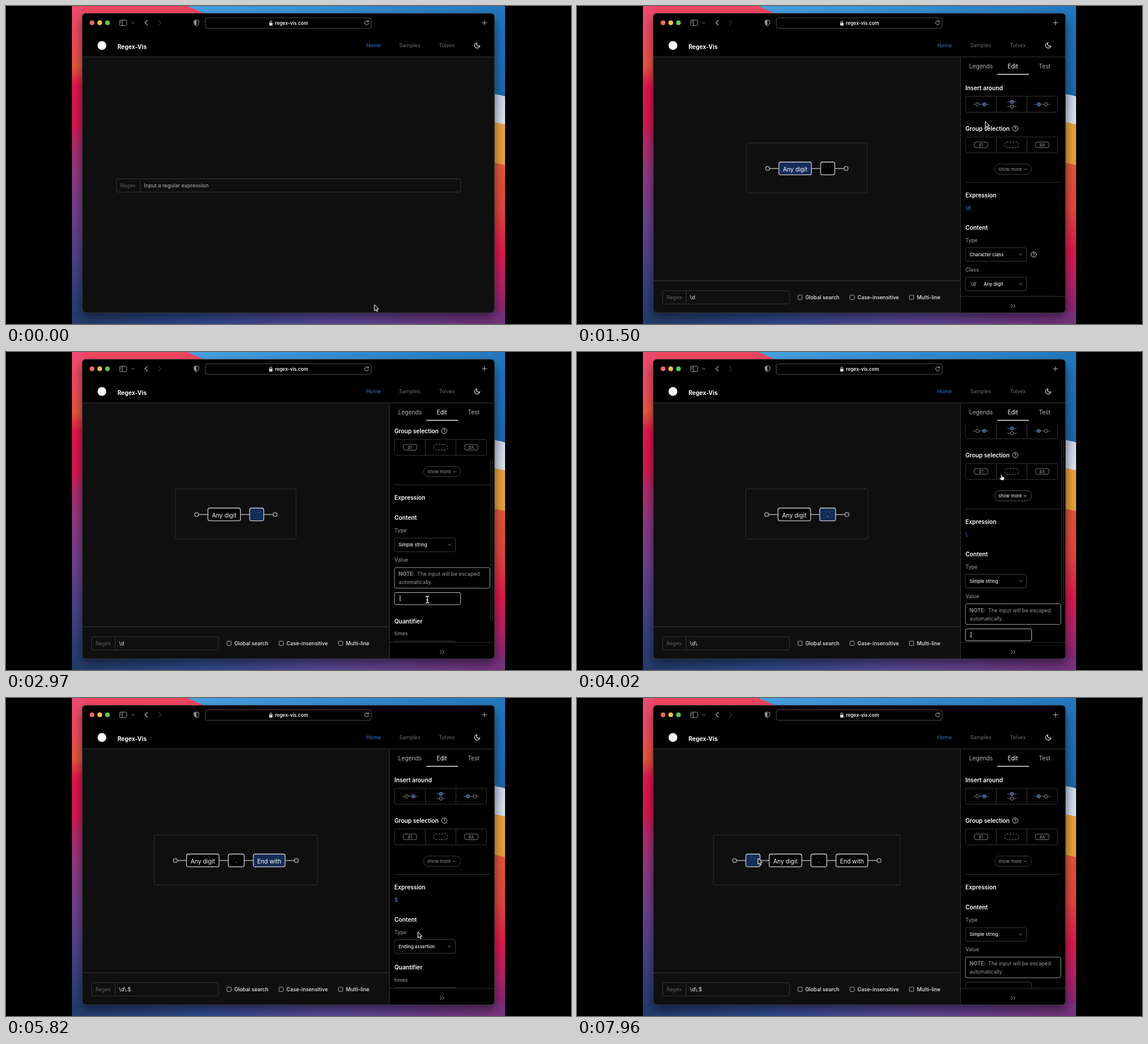
Write an HTML page that moves like this. It is 960 by 540 pixels and loops after 8 s.

```html
<!DOCTYPE html>
<html lang="en">
<head>
<meta charset="utf-8">
<title>Regex editor demo</title>
<style>
html, body { margin: 0; width: 100%; height: 100%; overflow: hidden; background: #000; }
svg { display: block; width: 960px; height: 540px; font-family: Inter, Roboto, sans-serif; }
</style>
</head>
<body>
<svg id="stage" viewBox="0 0 960 540" xmlns="http://www.w3.org/2000/svg">
  <defs>
    <linearGradient id="left" x2="0" y2="1">
      <stop offset="0" stop-color="#ea4b70"/><stop offset=".12" stop-color="#ee4c5c"/>
      <stop offset=".19" stop-color="#e9573f"/><stop offset=".25" stop-color="#e3174e"/>
      <stop offset=".37" stop-color="#d6164f"/><stop offset=".43" stop-color="#b32a6c"/>
      <stop offset=".52" stop-color="#913880"/><stop offset=".65" stop-color="#71408c"/>
      <stop offset=".8" stop-color="#4c4288"/><stop offset=".92" stop-color="#2e3f78"/>
      <stop offset="1" stop-color="#223c6c"/>
    </linearGradient>
    <linearGradient id="top">
      <stop offset="0" stop-color="#58b0e8"/><stop offset=".5" stop-color="#3c93d6"/><stop offset="1" stop-color="#2377bd"/>
    </linearGradient>
    <linearGradient id="sky" x2="0" y2="1">
      <stop offset="0" stop-color="#2377bd"/><stop offset="1" stop-color="#1c68ab"/>
    </linearGradient>
    <linearGradient id="pale" x2="1" y2=".6">
      <stop offset="0" stop-color="#bccbe8"/><stop offset="1" stop-color="#dde3ee"/>
    </linearGradient>
    <linearGradient id="warm" x2="0" y2="1">
      <stop offset="0" stop-color="#e4573c"/><stop offset=".3" stop-color="#e2463f"/>
      <stop offset=".55" stop-color="#df184e"/><stop offset=".75" stop-color="#b3216a"/>
      <stop offset="1" stop-color="#6c2b76"/>
    </linearGradient>
    <linearGradient id="low">
      <stop offset="0" stop-color="#243c6c"/><stop offset=".3" stop-color="#2f4a8e"/>
      <stop offset=".6" stop-color="#5b4898"/><stop offset="1" stop-color="#78317c"/>
    </linearGradient>
    <filter id="blur" x="-10%" y="-10%" width="120%" height="120%"><feGaussianBlur stdDeviation="9"/></filter>
    <clipPath id="desk"><rect x="112" width="736" height="540"/></clipPath>
    <clipPath id="win"><rect x="129.5" y="12.5" width="700.5" height="508.5" rx="6"/></clipPath>
    <clipPath id="side"><rect x="652" y="122" width="178" height="371"/></clipPath>
  </defs>

  <rect width="960" height="540"/>
  <g clip-path="url(#desk)">
    <rect x="112" width="736" height="14" fill="url(#top)"/>
    <path d="M112 0H308L340 14H112Z" fill="#ef4660"/>
    <rect x="112" width="20" height="540" fill="url(#left)"/>
    <rect x="828" width="20" height="152" fill="url(#sky)"/>
    <path d="M828 149L848 153V202L828 197Z" fill="url(#pale)"/>
    <path d="M828 197L848 201V271L828 266Z" fill="#e7a33e"/>
    <path d="M828 266L848 270V540H828Z" fill="url(#warm)"/>
    <rect x="112" y="519" width="736" height="21" fill="url(#low)"/>
    <rect x="129" y="22" width="702" height="507" rx="8" opacity=".5" filter="url(#blur)"/>
  </g>

  <g clip-path="url(#win)">
    <rect x="129" y="12" width="702" height="510" fill="#0f0f10"/>
    <rect x="129" y="12" width="702" height="74.5"/>
    <path d="M129 86.5H831" stroke="#333"/>
    <g id="chrome"></g>
    <g id="page"></g>
    <g clip-path="url(#side)"><g id="scroll"></g></g>
    <rect id="thumb" x="823.5" width="3" height="276" rx="1.5" fill="none" stroke="#2b2b2b"/>
  </g>
  <rect x="129.5" y="12.5" width="700.5" height="508.5" rx="6" fill="none" stroke="#424242" stroke-width=".8"/>

  <g id="pointer" stroke-linejoin="round">
    <path id="arrow" d="M0 0V10.4L2.4 8.3L4 11.8L5.7 11L4.1 7.6H7.2Z" fill="#111" stroke="#fff"/>
    <path id="beam" d="M-3 -5.5Q0 -5.5 0 -3.5Q0 -5.5 3 -5.5M0 -3.5V4M-3 6Q0 6 0 4Q0 6 3 6M-1.5 1H1.5" fill="none" stroke="#eee" stroke-width="1.3"/>
    <path id="hand" d="M-2 -4.5Q-1 -5.5 -.4 -4.4L.2 -1.2L3.6 -.5Q4.6 0 4.3 1.4L3.5 4.7H-1.6L-4 1.4Q-4 .2 -2.6 .8L-1.6 1.6Z" fill="#fff" stroke="#222" stroke-width=".7"/>
  </g>
</svg>

<script>
const LOOP = 8000;
const $ = id => document.getElementById(id);

// Drawing helpers; text is placed by its vertical middle.
const text = (x, y, s, size, fill = '#fff', weight = 400, anchor = 'start') =>
  `<text x="${x}" y="${y + size * 0.36}" font-size="${size}" fill="${fill}" font-weight="${weight}" text-anchor="${anchor}">${s}</text>`;
const box = (x, y, w, h, stroke, rx = 2.5, extra = '') =>
  `<rect x="${x}" y="${y}" width="${w}" height="${h}" rx="${rx}" fill="none" stroke="${stroke}" ${extra}/>`;
const path = (d, stroke, width = 1, extra = '') =>
  `<path d="${d}" fill="none" stroke="${stroke}" stroke-width="${width}" ${extra}/>`;
const dot = (x, y, r, fill, stroke = 'none', width = 1) =>
  `<circle cx="${x}" cy="${y}" r="${r}" fill="${fill}" stroke="${stroke}" stroke-width="${width}"/>`;
const rule = y => path(`M660 ${y}H822`, '#2e2e2e');
const help = (x, y) => dot(x, y, 4.5, 'none', '#ccc') + text(x, y, '?', 7, '#ddd', 500, 'middle');
const chevron = (x, y, s = 2.5, c = '#888') => path(`M${x - s} ${y - s / 2}L${x} ${y + s / 2}L${x + s} ${y - s / 2}`, c);

const KINDS = {
  d: { width: 55.3, label: 'Any digit', expr: '\\d', type: 'Character class' },
  e: { width: 24, label: '', expr: '', type: 'Simple string' },
  '.': { width: 27, label: '.', expr: '\\.', type: 'Simple string' },
  $: { width: 54, label: 'End with', expr: '$', type: 'Ending assertion' }
};

// start, nodes, selected index, regex
const STEPS = [
  [0, '', -1, ''],
  [620, '', -1, '\\'],
  [740, 'd', -1, '\\d'],
  [1110, 'd', 0, '\\d'],
  [1420, 'de', 0, '\\d'],
  [1680, 'de', 1, '\\d'],
  [3200, 'd.', 1, '\\d\\.'],
  [4390, 'd.e', 1, '\\d\\.'],
  [5200, 'd.e', 2, '\\d\\.'],
  [5760, 'd.$', 2, '\\d\\.$'],
  [6420, 'd.$', 0, '\\d\\.$'],
  [7000, 'ed.$', 1, '\\d\\.$'],
  [7930, 'ed.$', 0, '\\d\\.$']
];

// time, x, y
const MOVES = [
  [30, 626, 507], [520, 538, 291], [870, 538, 291], [1080, 395, 276], [1130, 395, 276],
  [1390, 790, 167], [1430, 790, 167], [1640, 428, 276], [1690, 428, 276],
  [1940, 735.5, 353.5], [2570, 735.5, 353.5], [2930, 716, 420], [3530, 716, 420],
  [4020, 722, 213], [4330, 791, 164], [4400, 791, 164], [4660, 600, 236],
  [4920, 600, 236], [5130, 448, 275], [5240, 448, 275], [5520, 706, 399],
  [5780, 706, 399], [6320, 331.5, 273], [6610, 331.5, 273], [6900, 686, 167],
  [7440, 686, 167], [7860, 307.5, 272]
];

const SCROLL = [
  [1800, 0], [1970, 74], [3560, 74], [4020, 33], [4260, 3.5], [5199, 3.5], [5200, 0]
];

// start, pointer shape
const SHAPES = [
  [0, 'arrow'], [1040, 'beam'], [1160, 'arrow'], [1340, 'hand'], [1460, 'arrow'],
  [1610, 'beam'], [1720, 'arrow'], [2900, 'beam'], [3600, 'arrow'], [3960, 'hand'],
  [4440, 'arrow'], [5080, 'beam'], [5280, 'arrow'], [6260, 'beam'], [6650, 'arrow'],
  [6840, 'hand'], [7500, 'arrow']
];

const current = (list, t) => list.filter(row => row[0] <= t).pop();

function tween(list, t, i) {
  const k = list.findIndex(row => row[0] > t);
  if (k === 0) return list[0][i];
  if (k < 0) return list[list.length - 1][i];
  const a = list[k - 1], b = list[k];
  const p = (t - a[0]) / (b[0] - a[0]);
  return a[i] + (b[i] - a[i]) * p * p * (3 - 2 * p);
}

function chrome() {
  const lights = ['#ec6a5e', '#f4bf4f', '#61c554'].map((c, i) => dot(146.2 + i * 13.1, 28.5, 4, c)).join('');
  return lights
    + box(193, 24, 12, 9.3, '#999', 1.8) + path('M197.5 24V33.3M194.5 26.5H196M194.5 28.5H196', '#999')
    + chevron(215.5, 28.5, 2.2, '#999')
    + path('M240.5 24L236 28.4L240.5 32.8', '#aaa', 1.2) + path('M259 24L263 28.4L259 32.8', '#333', 1.2)
    + path('M323.5 23.5L327.7 25V28.5Q327.7 32 323.5 33.7Q319.3 32 319.3 28.5V25Z', '#999')
    + '<path d="M323.5 24V33Q320 31.5 320 28.5V25.3Z" fill="#999"/>'
    + box(338.5, 20, 282, 18, '#4c4c4c', 4)
    + '<rect x="447.2" y="28.6" width="5.6" height="4.6" rx=".8" fill="#ddd"/>' + path('M448.4 29V27.2A1.6 1.7 0 0 1 451.6 27.2V29', '#ddd')
    + text(457, 29.3, 'regex-vis.com', 8.05, '#f2f2f2', 600)
    + path('M615.6 26.6A3.4 3.4 0 1 0 616.3 29M616 24.6V27H613.6', '#bbb')
    + path('M808.8 28.5H817.2M813 24.3V32.7', '#aaa', 1.1)
    + dot(163, 67, 7.5, '#fff')
    + text(189.5, 69, 'Regex-Vis', 9.9, '#fff', 700)
    + text(612, 67, 'Home', 8.9, '#2d78c9')
    + text(668, 67, 'Samples', 8.9, '#6c6c6c')
    + text(735.5, 67, 'Tolvex', 8.9, '#6c6c6c')
    + path('M21 12.8A9 9 0 1 1 11.2 3A7 7 0 0 0 21 12.8Z', '#eee', 2.2, 'transform="translate(794.6 61) scale(.5)" stroke-linejoin="round"');
}

function home(regex, focus) {
  return box(187.5, 293.5, 585, 22.5, '#333', 3) + path('M228 293.5V316', '#333')
    + (focus ? box(228, 293.5, 544.5, 22.5, '#9a98ac', 2) : '')
    + text(194, 305, 'Regex', 8.95, '#5c5c5c')
    + text(234.5, 305, regex || 'Input a regular expression', 8.95, regex ? '#eee' : '#b4b4b4');
}

function quoted(x, y, s, size = 10.2) {
  const half = s.length * size * 0.29 + 2;
  return text(x - half, y - 1.5, "'", 7, '#777', 400, 'middle')
    + text(x, y, s, size, '#fff', 400, 'middle')
    + text(x + half, y - 1.5, "'", 7, '#777', 400, 'middle');
}

function node(x, kind, selected) {
  const { width, label } = KINDS[kind], mid = x + width / 2;
  let out = `<rect x="${x}" y="265" width="${width}" height="21.6" rx="3.2" fill="${selected ? '#152c58' : '#000'}" stroke="#c6c6cb" stroke-width="1.3"/>`;
  if (width < 30) {
    out += text(mid - 3.2, 274.5, "'", 7, '#75809a', 400, 'middle') + text(mid + 3.2, 274.5, "'", 7, '#75809a', 400, 'middle');
    if (label) out += text(mid, 276.8, label, 10, '#fff', 400, 'middle');
  } else out += text(mid, 277, label, 10, '#fff', 400, 'middle');
  return out;
}

function graph(kinds, selected) {
  const gap = 15.6, end = 19.2, pad = 35.7;
  const inner = [...kinds].reduce((sum, k) => sum + KINDS[k].width + gap, -gap);
  const width = inner + 2 * (end + pad), left = 390.5 - width / 2;
  const first = left + pad, last = left + width - pad;
  let x = first + end, out = box(left, 232.5, width, 85, '#303030', 2, 'stroke-width=".9"');
  out += path(`M${first} 276H${last}`, '#a5a5a9', 1.3);
  out += dot(first, 276, 3.4, '#0f0f10', '#a5a5a9', 1.4) + dot(last, 276, 3.4, '#0f0f10', '#a5a5a9', 1.4);
  [...kinds].forEach((k, i) => {
    out += node(x, k, i === selected);
    x += KINDS[k].width + gap;
  });
  return out;
}

function editor(kinds, selected, regex) {
  const legend = selected < 0;
  const flags = [[379, 'Global search'], [467.5, 'Case-insensitive'], [568.5, 'Multi-line']];
  const tabs = [[686.5, 'Legends', legend], [740.5, 'Edit', !legend], [794.5, 'Test', false]];
  const tone = (name, on) => on ? '#fff' : legend && name === 'Edit' ? '#444' : '#b0b0b0';
  return graph(kinds, selected)
    + path('M129 466.5H651', '#333')
    + box(145.5, 483.5, 215.5, 22.5, '#333', 3) + path('M185.5 483.5V506', '#333')
    + (legend ? box(185.5, 483.5, 175.5, 22.5, '#a7a4b8', 2) + path('M201.8 489.5V499.5', '#fff', 0.9) : '')
    + text(152, 494.8, 'Regex', 8.95, '#5c5c5c') + text(192, 494.8, regex, 9, '#eee')
    + flags.map(([x, s]) => box(x - 3.7, 491, 7.4, 7.4, '#a8a8a8', 1.5) + text(x + 9, 494.8, s, 8.8, '#eee', 500)).join('')
    + '<rect x="652" y="87" width="179" height="435"/>' + path('M651.5 87V522M652 493H831', '#333')
    + tabs.map(([x, s, on]) => text(x, 102, s, 9.8, tone(s, on), 400, 'middle')).join('')
    + path(`M${legend ? 660 : 714} 116H${legend ? 714 : 768}`, '#ddd', 1.3)
    + path('M737.5 506.5L740.3 509.5L737.5 512.5M741.3 506.5L744.1 509.5L741.3 512.5', '#aaa');
}

function legends() {
  const head = (y, s) => text(660, y, s, 9.85, '#fff', 600);
  const body = (y, s) => text(660, y, s, 9.5, '#8c8c8c');
  const frame = (y, w) => box(662.4, y, w, 21.4, '#c0c0c5', 3.2, 'stroke-width="1.3"');
  const range = (y, s) => text(685.5, y, s, 7.75, '#eee', 500, 'middle') + frame(y + 6.7, 46.2)
    + quoted(672.5, y + 18.5, 'a') + text(685.5, y + 18, '-', 9, '#bbb', 400, 'middle') + quoted(698.5, y + 18.5, 'z');
  return dot(664, 130.5, 4, 'none', '#ddd') + path('M661.8 130.5H666.2M664 128.3V132.7', '#ddd')
    + text(672.5, 130.3, 'You can select nodes by dragging', 8.8, '#eee', 500) + text(660, 144, 'or clicking', 8.8, '#eee', 500)
    + rule(153.5) + head(172.5, 'Characters:') + frame(190, 36.8) + quoted(681, 201.8, 'abc') + body(222, 'Direct match characters')
    + rule(237.5) + head(253.8, 'Character classes:') + frame(271.3, 54.3) + text(689.5, 283, 'Any digit', 10, '#fff', 400, 'middle')
    + body(303.3, 'Distinguish different types of') + body(319, 'characters')
    + rule(334.5) + head(351, 'Ranges:') + range(368, 'One of')
    + body(413, 'Matches any one of the enclosed') + body(428.7, 'characters') + range(455.3, 'None of');
}

function edit(kind, focus, bright) {
  const { expr, type } = KINDS[kind];
  const head = (y, s) => text(660, y, s, 9.85, '#fff', 600);
  const label = (y, s) => text(660, y, s, 8.75, '#8c8c8c', 500);
  const trio = y => box(660, y, 156.5, 27, '#333', 2.5) + path(`M712.5 ${y}v27M764.5 ${y}v27`, '#333');
  const select = (y, s) => box(660, y - 11.5, 103.5, 23, '#383838') + s + chevron(753.5, y);
  const chain = (x, y, blue, plain) => path(`M${x - 13.5} ${y}h27`, '#666')
    + dot(plain, y, 2.8, '#000', '#888') + dot(blue, y, 2.8, '#284f88', '#6683ad');
  const pill = (x, s, extra = '') => box(x - 11.5, 231, 23, 9.6, '#777', 3, extra) + text(x, 236, s, 7, '#888', 500, 'middle');
  const tone = bright ? '#fff' : '#9a9a9a';
  let out = head(139, 'Insert around') + trio(153.3)
    + chain(686.3, 167, 692.2, 680.5) + chain(790.8, 167, 784.7, 796.8)
    + path('M731 162.8H747M731 170.8H747', '#666') + dot(739, 162.8, 2.8, '#284f88', '#6683ad') + dot(739, 170.8, 2.8, '#000', '#888')
    + head(208, 'Group selection') + help(744.7, 208) + trio(222.3)
    + pill(686.5, '#1') + pill(738.5, '', 'stroke-dasharray="3 2"') + pill(790.5, '#A')
    + box(709.5, 268.3, 63, 17.5, bright ? '#555' : '#3c3c3c', 8.7)
    + text(716, 277, 'show more', 7.6, tone) + chevron(761.5, 277.3, 2, tone)
    + rule(299.5) + head(321, 'Expression');
  if (expr) out += text(660, 342.3, expr, 9, '#4c8ad2');
  const y = expr ? 397.5 : 377;
  out += head(y - 21.3, 'Content') + label(y, 'Type') + select(y + 24.5, text(667, y + 24.3, type, 7.75, '#eee', 500));
  let next = y + 60;
  if (kind === 'd') {
    out += help(776, y + 24.5) + label(y + 50, 'Class')
      + select(y + 74.5, text(667, y + 74.3, '`\\d`', 7.9, '#ddd') + text(691, y + 74.3, 'Any digit', 7.8, '#eee', 500));
    next = y + 124;
  } else if (kind !== '$') {
    out += label(y + 50, 'Value') + box(660, y + 63, 162, 35, '#8f939f', 2.5)
      + text(667, y + 74.3, '<tspan font-weight="600">NOTE:</tspan>', 8.8, '#999') + text(698.5, y + 74.3, 'The input will be escaped', 8.8, '#999')
      + text(667, y + 88, 'automatically.', 8.8, '#999')
      + box(660, y + 105.5, 112.5, 20.5, focus ? '#b5b5b5' : '#383838');
    if (expr) out += text(666.5, y + 115.7, '.', 9);
    if (focus) out += path(`M669.6 ${y + 110.5}v10`, '#fff', 0.9);
    next = y + 154;
  }
  return out + head(next, 'Quantifier') + label(next + 21, 'times') + select(next + 45.5, '');
}

$('chrome').innerHTML = chrome();
let shown = '';

function render(t) {
  const [, kinds, selected, regex] = current(STEPS, t);
  const focus = t >= 2960 && t < 4390;
  const bright = t > 3850 && t < 4100;
  const typing = t >= 540;
  const key = [kinds, selected, regex, focus, bright, typing].join('|');
  if (key !== shown) {
    shown = key;
    $('page').innerHTML = kinds ? editor(kinds, selected, regex) : home(regex, typing);
    $('scroll').innerHTML = !kinds ? '' : selected < 0 ? legends() : edit(kinds[selected], focus, bright);
  }
  const top = tween(SCROLL, t, 1);
  $('scroll').setAttribute('transform', `translate(0 ${-top})`);
  $('thumb').setAttribute('y', 123 + top * 0.8);
  $('thumb').style.display = top > 0 ? '' : 'none';
  $('pointer').setAttribute('transform', `translate(${tween(MOVES, t, 1)} ${tween(MOVES, t, 2)})`);
  const shape = current(SHAPES, t)[1];
  for (const id of ['arrow', 'beam', 'hand']) $(id).style.display = id === shape ? '' : 'none';
}

const start = performance.now();
function frame() {
  render((performance.now() - start) % LOOP);
  requestAnimationFrame(frame);
}
frame();
</script>
</body>
</html>
```
